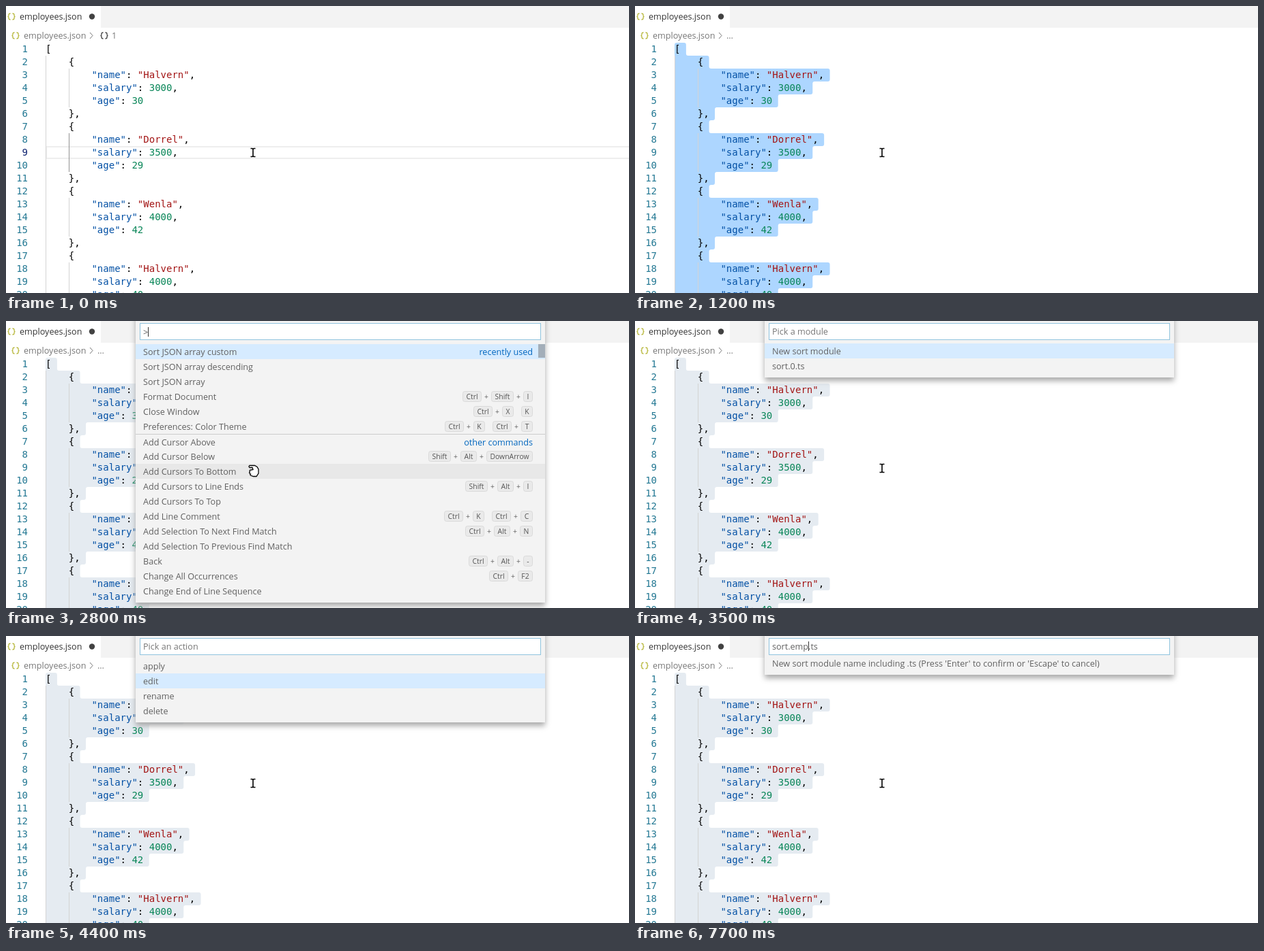
An HTML page with a canvas for the animation above (8000 ms loop, 913 by 422 pixels).

```html
<!DOCTYPE html>
<html lang="en">
<head>
<meta charset="utf-8">
<title>Sorting a JSON array</title>
<style>
  html, body { margin: 0; width: 100%; height: 100%; overflow: hidden; background: #fff; }
  canvas { display: block; }
</style>
</head>
<body>
<canvas id="stage" width="913" height="422"></canvas>
<script>
const ctx = document.getElementById('stage').getContext('2d');
const LOOP = 8000, TOP = 54, LINE = 19, LEFT = 58, CHAR = 8.428;
const UI = '12.6px "Open Sans", sans-serif';
const KEY = '10.4px "Open Sans", sans-serif';
const CODE = '14px "DejaVu Sans Mono", monospace';
const GREY = '#616161';

const people = [['Halvern', 3000, 30], ['Dorrel', 3500, 29], ['Wenla', 4000, 42], ['Halvern', 4000, 40]];
const lines = ['[', ...people.flatMap(([name, salary, age]) => [
  '    {',
  `        "name": "${name}",`,
  `        "salary": ${salary},`,
  `        "age": ${age}`,
  '    },'
])];

// Palette rows: label and key chords
const commands = [
  ['Sort JSON array custom'], ['Sort JSON array descending'], ['Sort JSON array'],
  ['Format Document', 'Ctrl+Shift+I'], ['Close Window', 'Ctrl+X K'],
  ['Preferences: Color Theme', 'Ctrl+K Ctrl+T'], ['Add Cursor Above'],
  ['Add Cursor Below', 'Shift+Alt+DownArrow'], ['Add Cursors To Bottom'],
  ['Add Cursors to Line Ends', 'Shift+Alt+I'], ['Add Cursors To Top'],
  ['Add Line Comment', 'Ctrl+K Ctrl+C'], ['Add Selection To Next Find Match', 'Ctrl+Alt+N'],
  ['Add Selection To Previous Find Match'], ['Back', 'Ctrl+Alt+-'],
  ['Change All Occurrences', 'Ctrl+F2'], ['Change End of Line Sequence']
];

// Timelines: [start in ms, value]
const selections = [   // first row, first column, last row, last column
  [0, null], [300, [8, 8, 8, 22]], [400, [7, 8, 9, 17]], [500, [6, 4, 10, 5]],
  [700, [6, 4, 10, 6]], [900, [0, 1, 20, 6]], [1100, [0, 0, 20, 6]]
];
const typing = [       // "|" is the caret
  [4700, 'sort.1.ts|'], [5400, 'sort.1.t|s'], [5500, 'sort.1.|ts'], [5600, 'sort.1|.ts'],
  [6100, 'sort.|.ts'], [6400, 'sort.e|.ts'], [6600, 'sort.emp|.ts'], [6900, 'sort.em|.ts'],
  [7000, 'sort.e|.ts'], [7500, 'sort.em|.ts'], [7700, 'sort.emp|.ts']
];
const panels = [
  [0, null], [1700, drawPalette], [2900, drawModules], [3900, null], [4000, drawActions], [4700, drawNaming]
];
const valueAt = (steps, t) => steps.filter(([start]) => start <= t).pop()[1];

function rect(x, y, w, h, color) {
  ctx.fillStyle = color;
  ctx.fillRect(x, y, w, h);
}

function text(s, x, y, color = GREY, font = UI, align = 'left') {
  ctx.font = font;
  ctx.textAlign = align;
  ctx.fillStyle = color;
  ctx.fillText(s, x, y);
}

function textWidth(s, font = UI) {
  ctx.font = font;
  return ctx.measureText(s).width;
}

function stroke(path, color, width = 1) {
  ctx.strokeStyle = color;
  ctx.lineWidth = width;
  ctx.stroke(new Path2D(path));
}

function braces(x, y, color) {
  stroke(`M${x + 4.5} ${y - 4.5}q-2.5 0 -2.5 2v1q0 1.5 -1.5 1.5q1.5 0 1.5 1.5v1q0 2 2.5 2
    M${x + 7.5} ${y - 4.5}q2.5 0 2.5 2v1q0 1.5 1.5 1.5q-1.5 0 -1.5 1.5v1q0 2 -2.5 2`, color, 1.3);
}

function drawHeader(t) {
  rect(139, 0, 774, 32, '#f3f3f3');
  braces(2, 15.5, '#b7b73b');
  text('employees.json', 20, 20, '#333');
  ctx.beginPath();
  ctx.arc(126, 15.5, 4.2, 0, 7);
  ctx.fillStyle = '#424242';
  ctx.fill();
  braces(8, 43.5, '#b7b73b');
  text('employees.json', 26, 48, '#777');
  stroke('M123 39l4 4.5l-4 4.5', '#777');
  if (t < 1200) {
    braces(138, 43.5, '#424242');
    text('1', 155, 48, '#777');
  } else {
    text('…', 134, 48, '#777');
  }
}

function drawSelection([row0, col0, row1, col1], color) {
  const right = [], left = [];
  for (let row = row0; row <= row1; row++) {
    const y = TOP + row * LINE;
    const x0 = LEFT + (row === row0 ? col0 : 0) * CHAR;
    const x1 = LEFT + (row === row1 ? col1 : lines[row].length + 1) * CHAR;
    right.push([x1, y], [x1, y + LINE]);
    left.unshift([x0, y + LINE], [x0, y]);
  }
  const points = [...right, ...left];
  const start = [(right[0][0] + left[left.length - 1][0]) / 2, right[0][1]];
  ctx.beginPath();
  ctx.moveTo(...start);
  points.forEach((p, i) => ctx.arcTo(...p, ...(points[i + 1] || start), 3));
  ctx.fillStyle = color;
  ctx.fill();
}

function drawCode(t) {
  const selection = valueAt(selections, t);
  const focused = !valueAt(panels, t);
  const activeRow = selection ? selection[2] : 8;

  if (selection) {
    drawSelection(selection, focused ? '#add6ff' : '#e5ebf1');
  } else {
    ctx.strokeStyle = '#eee';
    ctx.lineWidth = 2;
    ctx.strokeRect(LEFT + 1, TOP + activeRow * LINE + 1, 900, LINE - 2);
  }
  rect(LEFT, TOP + LINE, 1, 400, '#d3d3d3');
  people.forEach((_, i) =>
    rect(92, TOP + (2 + 5 * i) * LINE, 1, 3 * LINE, i === 1 && t < 900 ? '#939393' : '#d3d3d3'));

  lines.forEach((line, row) => {
    const y = TOP + row * LINE + 14;
    text(row + 1, 32, y, row === activeRow ? '#0b216f' : '#237893', CODE, 'right');
    for (const { 0: token, index } of line.matchAll(/"[^"]*"|\d+|[^"\d\s]+/g)) {
      const isKey = line[index + token.length] === ':';
      const color = token[0] === '"' ? (isKey ? '#0451a5' : '#a31515') : /\d/.test(token) ? '#098658' : '#000';
      text(token, LEFT + index * CHAR, y, color, CODE);
    }
  });
}

function drawBox(height, y = 3) {
  ctx.save();
  ctx.shadowColor = '#a8a8a8';
  ctx.shadowBlur = 8;
  ctx.shadowOffsetY = 5;
  rect(190, -10, 600, height + 10, '#f3f3f3');
  ctx.restore();
  rect(196, y, 588, 25, '#8fc3de');
  rect(197, y + 1, 586, 23, '#fff');
}

const caret = (x, y = 8) => rect(Math.round(x), y, 1, 14, '#333');

function drawKeys(chords, y) {
  let x = 772;
  chords.split(' ').reverse().forEach(chord => {
    chord.split('+').reverse().forEach((key, i) => {
      if (i) {
        text('+', x - 7, y + 4, GREY, KEY, 'center');
        x -= 14;
      }
      const w = Math.round(textWidth(key, KEY) + 11);
      ctx.beginPath();
      ctx.roundRect(x - w + .5, y - 7.5, w - 1, 15, 3);
      ctx.fillStyle = '#eaeaea';
      ctx.fill();
      ctx.strokeStyle = '#dadada';
      ctx.lineWidth = 1;
      ctx.stroke();
      text(key, x - w / 2, y + 4, '#555', KEY, 'center');
      x -= w;
    });
    x -= 11;
  });
}

function drawPalette(t) {
  drawBox(t < 1800 ? 34 : 414, 3);
  text('>', 201, 21);
  if (t < 2200 || t >= 2800) caret(208, 9);
  if (t < 1800) return;
  rect(190, 34, 600, 22, '#d6ebff');
  rect(190, 210, 600, 22, '#e8e8e8');
  rect(190, 166, 600, 1, '#ccc');
  rect(780, 34, 10, 20, 'rgba(100,100,100,.45)');
  commands.forEach(([label, keys], i) => {
    const y = 45 + 22 * i + (i === 6);
    text(label, 201, y + 5);
    if (keys) drawKeys(keys, y);
  });
  text('recently used', 772, 50, '#0066bf', UI, 'right');
  text('other commands', 772, 183, '#0066bf', UI, 'right');
}

function drawPicker(placeholder, items, active, caretOn) {
  drawBox(39 + 22 * items.length);
  text(placeholder, 201, 20, '#767676');
  rect(190, 33 + 22 * active, 600, 22, '#d6ebff');
  items.forEach((item, i) => text(item, 201, 49 + 22 * i));
  if (caretOn) caret(201);
}

function drawModules(t) {
  drawPicker('Pick a module', ['New sort module', 'sort.0.ts'], 0, t < 3500);
}

function drawActions(t) {
  drawPicker('Pick an action', ['apply', 'edit', 'rename', 'delete'], t < 4400 ? 0 : 1, t < 4400);
}

function drawNaming(t) {
  const [before, after] = valueAt(typing, t).split('|');
  drawBox(57);
  if (t < 5200) rect(201, 8, textWidth(before), 14, '#add6ff');
  text(before + after, 201, 20);
  caret(201 + textWidth(before));
  text("New sort module name including .ts (Press 'Enter' to confirm or 'Escape' to cancel)", 201, 45);
}

function drawPointer(t) {
  if (t >= 1800 && t < 2900) {
    const hand = `M357 212.5h7.5l3.5 2l2 3.5v6l-3 4.5h-4.5l-4 -1.5q-1.500 -1.500 0 -2
      l-1.500 -1q-1 -1.500 .5 -2l-.5 -1.500q0 -1.500 2 -1.500l3 -.5l-1 -3h-4q-2 -1.500 0 -3z`;
    ctx.fillStyle = '#fff';
    ctx.fill(new Path2D(hand));
    stroke(hand, '#000', 1.3);
    return;
  }
  const y = t < 2900 ? 209 : 210;
  const beam = `M358.500 ${y + .5}h2.500l1 1l1 -1h2.500M362 ${y + 1}v11M358.500 ${y + 12.5}h2.500l1 -1l1 1h2.500`;
  stroke(beam, '#fff', 4);
  stroke(beam, '#000', 1.6);
}

function draw(now) {
  const t = now % LOOP;
  rect(0, 0, 913, 422, '#fff');
  drawHeader(t);
  drawCode(t);
  const panel = valueAt(panels, t);
  if (panel) panel(t);
  drawPointer(t);
  requestAnimationFrame(draw);
}
requestAnimationFrame(draw);
</script>
</body>
</html>
```
